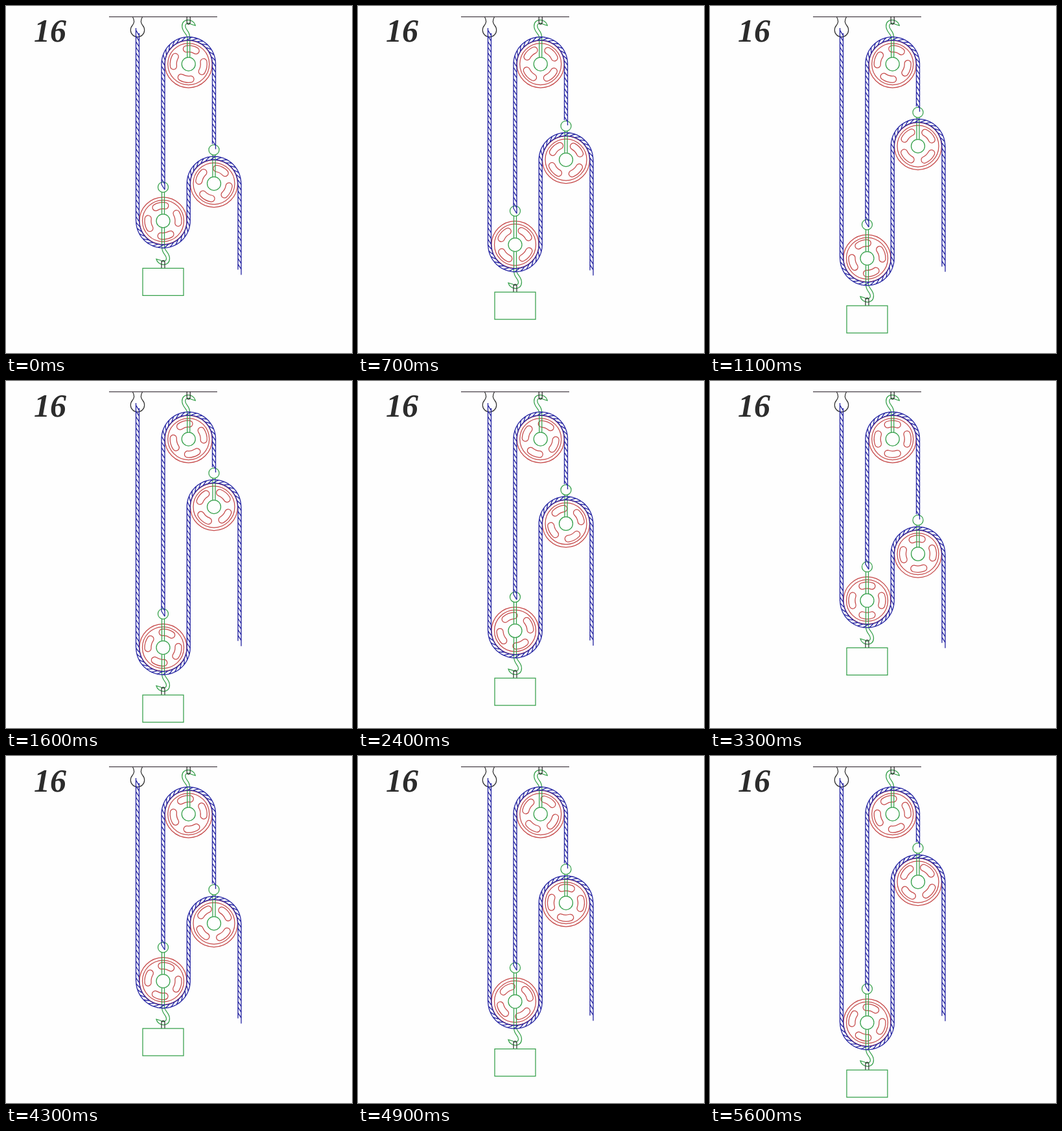
Write an HTML page with a canvas that moves like this. It is 534 px wide and 535 px high and loops after 5.7 s.

```html
<!DOCTYPE html>
<html>
<head>
<meta charset="utf-8">
<style>
  html, body { margin: 0; overflow: hidden; background: #fefefe; }
  canvas { display: block; }
</style>
</head>
<body>
<canvas id="stage" width="534" height="535"></canvas>
<script>
const ctx = document.getElementById('stage').getContext('2d');
const LOOP = 5700, STEP = 100;
const HIGH = 326, LOW = 411;          // travel of the lower pulley
const R = 39.25, HALF = 2.5;          // rope radius and half thickness
const PITCH = 8.7, SLANT = 8;         // rope strands
const X_LEFT = 203, X_LOWER = 242.5, X_TOP = 281.75, X_UPPER = 321, X_FREE = 360.5;
const TOP_Y = 89.5, ALIGNED_Y = 338.5;
const GREEN = '#35a04a', RED = '#c64a4a', BLUE = '#2a2aa4', DARK = '#333';

const hookShape = new Path2D('M-2 33C-2 27-10 24-10 15C-10 2 8 3 10.5 14L3.5 12C2 9.5-5 10-5 15C-5 21 2 22 2 33');
const linkShape = new Path2D('M-2.5 0V9Q-2.5 12 0 12Q2.5 12 2.5 9V0');
const bracket = new Path2D('M195.5 17Q200 24 195 30A10.7 10.7 0 1 0 211 30Q206 24 210.5 17');

function lowerY(t) {
  const tick = Math.floor(t / STEP);
  if (tick >= 19 && tick < 39) return Math.max(HIGH, LOW - 5.18 * (tick - 19));
  return Math.min(LOW, HIGH + 5.25 * (tick < 19 ? tick + 1 : tick - 39));
}

function stroke(color, draw, width = 1.25) {
  ctx.strokeStyle = color;
  ctx.lineWidth = width;
  ctx.beginPath();
  draw();
  ctx.stroke();
}

function circle(x, y, r, color) {
  stroke(color, () => ctx.arc(x, y, r, 0, 2 * Math.PI));
}

function rod(x, y0, y1) {
  stroke(GREEN, () => {
    for (const side of [-2, 2]) {
      ctx.moveTo(x + side, y0);
      ctx.lineTo(x + side, y1);
    }
  });
}

function hook(x, y, turn) {
  ctx.save();
  ctx.translate(x, y);
  ctx.rotate(turn);
  ctx.lineWidth = 1.25;
  ctx.strokeStyle = GREEN;
  ctx.stroke(hookShape);
  ctx.strokeStyle = DARK;
  ctx.stroke(linkShape);
  ctx.restore();
}

function pulley(x, y, angle) {
  circle(x, y, 36.5, RED);
  circle(x, y, 32, RED);
  ctx.save();
  ctx.translate(x, y);
  ctx.rotate(angle);
  const a = 0.325, mid = 23.5, cap = 5;
  for (let i = 0; i < 4; i++) {
    ctx.rotate(Math.PI / 2);
    stroke(RED, () => {
      ctx.arc(0, 0, mid + cap, -a, a);
      ctx.arc(mid * Math.cos(a), mid * Math.sin(a), cap, a, a + Math.PI);
      ctx.arc(0, 0, mid - cap, a, -a, true);
      ctx.arc(mid * Math.cos(a), -mid * Math.sin(a), cap, Math.PI - a, 2 * Math.PI - a);
      ctx.closePath();
    });
  }
  ctx.restore();
  circle(x, y, 10.5, GREEN);
}

// Rope pieces: a length and a point at distance s, shifted sideways by off
function straight(x, y0, y1) {
  const dir = Math.sign(y1 - y0);
  return { length: Math.abs(y1 - y0), at: (s, off) => [x - dir * off, y0 + dir * s] };
}

function bend(x, y, side) {           // side 1: under the wheel, -1: over it
  return {
    length: Math.PI * R,
    at(s, off) {
      const a = Math.PI - side * s / R, r = R + side * off;
      return [x + r * Math.cos(a), y + r * Math.sin(a)];
    }
  };
}

const ropeLength = pieces => pieces.reduce((sum, p) => sum + p.length, 0);

function rope(pieces, length, phase = 0) {
  const point = (s, off) => {
    let i = 0;
    while (i < pieces.length - 1 && s > pieces[i].length) s -= pieces[i++].length;
    return pieces[i].at(s, off);
  };
  stroke(BLUE, () => {
    for (const [off, shift] of [[HALF, 0], [-HALF, SLANT]]) {
      ctx.moveTo(...point(shift, off));
      for (let s = 2; s < length; s += 2) ctx.lineTo(...point(s + shift, off));
      ctx.lineTo(...point(length + shift, off));
    }
    for (let s = phase; s < length - 1; s += PITCH) {
      ctx.moveTo(...point(s, HALF));
      for (let k = 1; k <= 4; k++) ctx.lineTo(...point(s + SLANT * k / 4, HALF - HALF * k / 2));
    }
  }, 1.35);
}

function draw(t) {
  const low = lowerY(t), up = 605 - low;
  const turn = (low - ALIGNED_Y) / 39.4;

  ctx.fillStyle = '#fefefe';
  ctx.fillRect(0, 0, 534, 535);
  ctx.fillStyle = '#2c2c2c';
  ctx.font = 'italic bold 50px "Liberation Serif", serif';
  ctx.fillText('16', 43, 55);

  stroke('#4a424a', () => { ctx.moveTo(159, 16.5); ctx.lineTo(326, 16.5); });
  ctx.strokeStyle = DARK;
  ctx.stroke(bracket);

  pulley(X_TOP, TOP_Y, -turn);
  pulley(X_LOWER, low, turn);
  pulley(X_UPPER, up, -3 * turn - 0.06);

  hook(X_TOP, 16, 0);
  rod(X_TOP, 49, TOP_Y - 10.5);
  for (const [x, y] of [[X_LOWER, low], [X_UPPER, up]]) {
    circle(x, y - 52, 8, GREEN);
    rod(x, y - 44, y - 10.5);
  }
  rod(X_LOWER, low + 10.5, low + 40);
  hook(X_LOWER, low + 73, Math.PI);
  stroke(GREEN, () => ctx.rect(211, low + 73, 63, 42));

  const pull = [
    straight(X_LEFT, 34, low), bend(X_LOWER, low, 1),
    straight(X_TOP, low, up), bend(X_UPPER, up, -1),
    straight(X_FREE, up, 405)
  ];
  // The free end is cut after the last whole strand
  const phase = 3.4, slack = 2.5;
  const strands = Math.floor((ropeLength(pull) - phase + slack) / PITCH);
  rope(pull, phase + PITCH * strands, phase);

  const tie = [
    straight(X_LOWER, low - 48, TOP_Y), bend(X_TOP, TOP_Y, -1),
    straight(X_UPPER, TOP_Y, up - 61)
  ];
  rope(tie, ropeLength(tie));
}

function frame() {
  draw(performance.now() % LOOP);
  requestAnimationFrame(frame);
}
frame();
</script>
</body>
</html>
```
